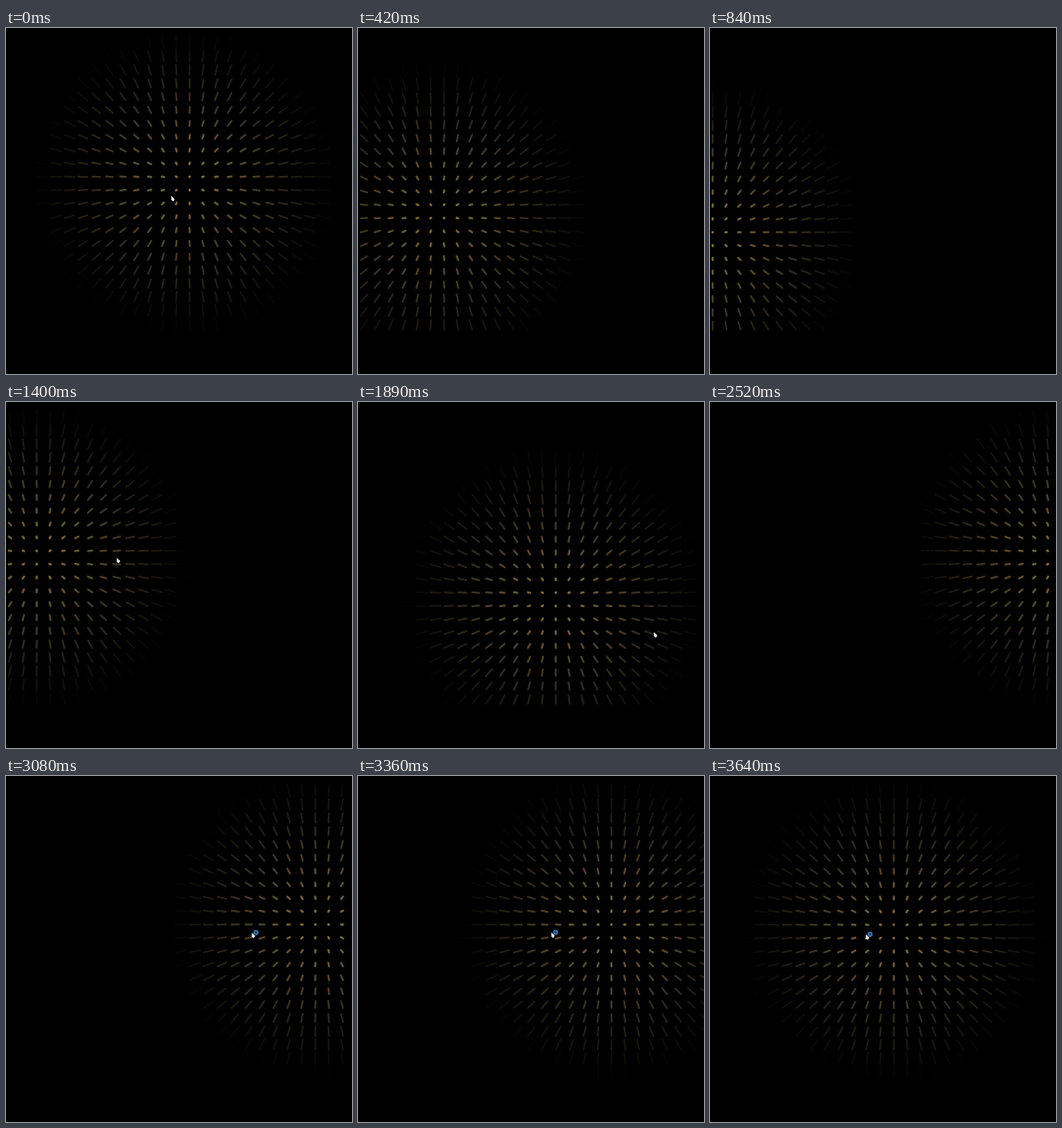
Animation of 400 by 400 pixels, one loop 3.71 s. Source, as an HTML page with a canvas:

```html
<!DOCTYPE html>
<html lang="en">
<head>
<meta charset="utf-8">
<title>Needle field</title>
<style>
  html, body { margin: 0; width: 100%; height: 100%; overflow: hidden; background: #000; }
  canvas { display: block; width: 400px; height: 400px; }
</style>
</head>
<body>
<canvas id="stage" width="400" height="400"></canvas>
<script>
const ctx = document.getElementById('stage').getContext('2d');
const LOOP = 3710, STEP = 70;
const PITCH = 16.1, LEFT = 3.2, TOP = 10.7, COLS = 26, ROWS = 22;
const REACH = 182, PULL = 1 / 12;

// Key points: [time, x, y]
const focusPath = [
  [0, 208, 178], [840, 1, 237], [1400, 38, 179], [1890, 228, 228],
  [2520, 406, 179], [3080, 362, 171], [3640, 212, 178]
];
const pointerPath = [
  [0, 191, 194], [450, -20, 240], [1190, -15, 190], [1400, 128, 180],
  [1890, 342, 266], [2060, 410, 262], [2790, 410, 180], [3080, 284, 181], [3640, 180, 183]
];

// Closed smooth curve through unevenly spaced keys
function along(path, t) {
  const n = path.length;
  const key = i => {
    const [time, x, y] = path[(i + n) % n];
    return [time + Math.floor(i / n) * LOOP, x, y];
  };
  const i = path.findLastIndex(k => k[0] <= t);
  const before = key(i - 1), a = key(i), b = key(i + 1), after = key(i + 2);
  const span = b[0] - a[0], u = (t - a[0]) / span;
  return [1, 2].map(k => {
    const va = (b[k] - before[k]) / (b[0] - before[0]) * span;
    const vb = (after[k] - a[k]) / (after[0] - a[0]) * span;
    const d = b[k] - a[k];
    return a[k] + u * (va + u * (3 * d - 2 * va - vb + u * (va + vb - 2 * d)));
  });
}

function drawNeedles(cx, cy) {
  ctx.lineCap = 'round';
  for (let r = 0; r < ROWS; r++) {
    for (let c = 0; c < COLS; c++) {
      const x = LEFT + c * PITCH, y = TOP + r * PITCH;
      const dx = cx - x, dy = cy - y, far = Math.hypot(dx, dy) / REACH;
      if (far >= 1) continue;
      ctx.lineWidth = 2.6 - 0.8 * far;
      ctx.strokeStyle = `rgba(${150 - 45 * far}, ${126 - 24 * far}, ${54 + 22 * far}, ${1 - far})`;
      ctx.beginPath();
      ctx.moveTo(x, y);
      ctx.lineTo(x + dx * PULL, y + dy * PULL);
      ctx.stroke();
    }
  }
}

function drawPointer(x, y, busy) {
  if (busy) {
    ctx.fillStyle = '#1d4468';
    ctx.strokeStyle = '#3c79b4';
    ctx.lineWidth = 1.5;
    ctx.beginPath();
    ctx.arc(x + 5, y, 2.2, 0, 7);
    ctx.fill();
    ctx.stroke();
  }
  ctx.fillStyle = '#e4ecf2';
  ctx.beginPath();
  ctx.moveTo(x, y);
  ctx.lineTo(x + 0.2, y + 5);
  ctx.lineTo(x + 2.6, y + 6.4);
  ctx.lineTo(x + 4, y + 3.8);
  ctx.fill();
}

function draw(t) {
  ctx.fillStyle = '#000';
  ctx.fillRect(0, 0, 400, 400);
  drawNeedles(...along(focusPath, t));
  drawPointer(...along(pointerPath, t), t > 2800);
}

const start = performance.now();
function tick() {
  const t = Math.max(performance.now() - start, 0) % LOOP;
  draw(Math.floor(t / STEP) * STEP);
  requestAnimationFrame(tick);
}
tick();
</script>
</body>
</html>
```
